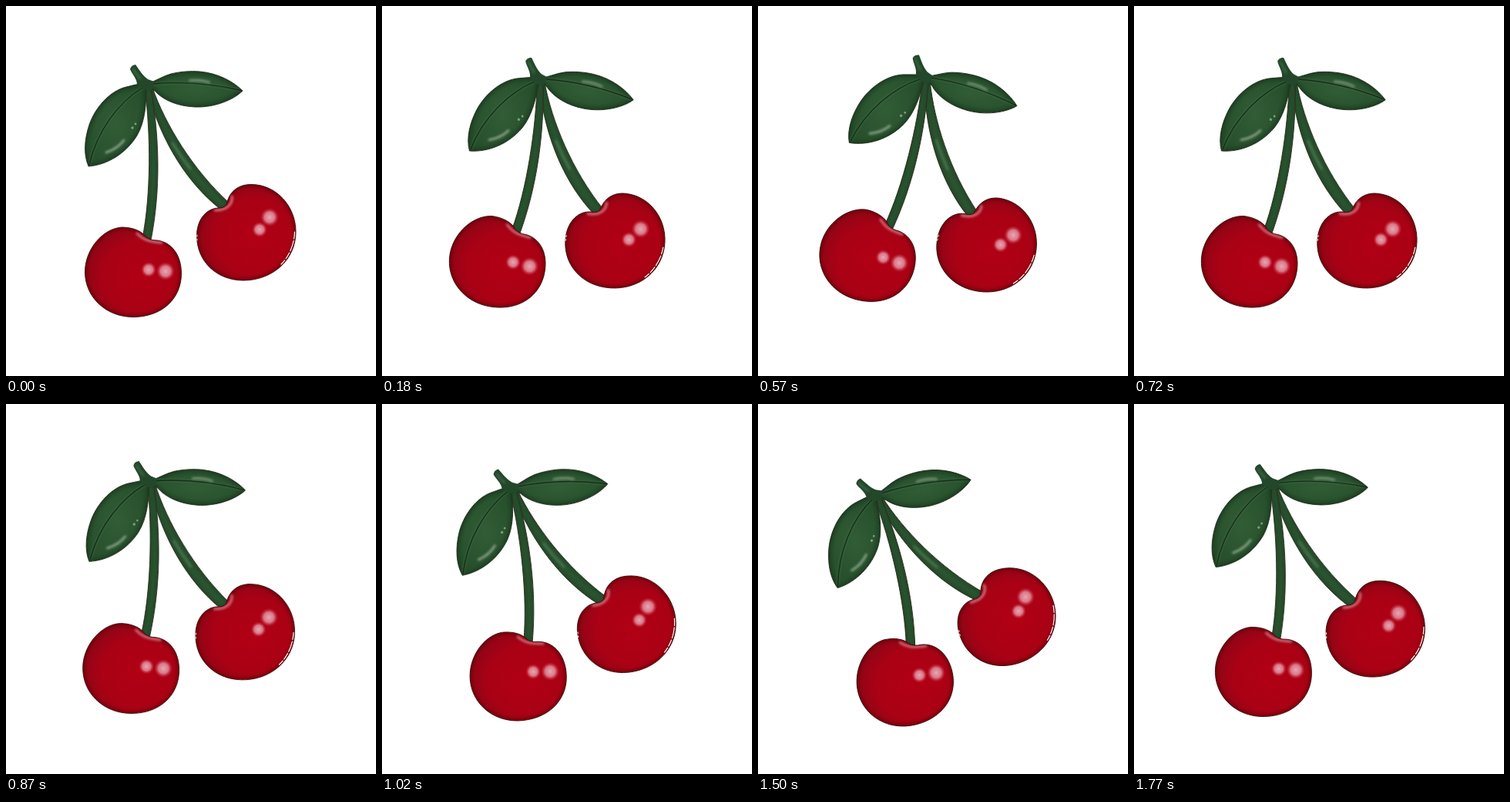
These frames come from a looping animation (480 by 480 pixels, 1.8 s). An HTML page:

```html
<!DOCTYPE html>
<html lang="en">
<head>
<meta charset="utf-8">
<title>Swinging cherries</title>
<style>
  html, body { margin: 0; width: 100%; height: 100%; overflow: hidden; background: #fff; }
  svg { display: block; width: 100%; height: 100%; }
</style>
</head>
<body>
<svg viewBox="0 0 480 480" fill="none" stroke-linecap="round" stroke-linejoin="round">
  <defs>
    <filter id="soft" x="-30%" y="-30%" width="160%" height="160%"><feGaussianBlur stdDeviation="2.6"/></filter>
    <filter id="glow" filterUnits="userSpaceOnUse" x="80" y="60" width="320" height="360"><feGaussianBlur stdDeviation="1.4"/></filter>
    <radialGradient id="red" cx=".58" cy=".55" r=".64">
      <stop offset="0" stop-color="#b10014"/>
      <stop offset=".6" stop-color="#aa0115"/>
      <stop offset="1" stop-color="#880616"/>
    </radialGradient>
    <radialGradient id="green" r=".6">
      <stop offset="0" stop-color="#315d35"/>
      <stop offset="1" stop-color="#264d2b"/>
    </radialGradient>
    <radialGradient id="shine">
      <stop offset="0" stop-color="#ecb0bb" stop-opacity=".95"/>
      <stop offset=".55" stop-color="#e08c9b" stop-opacity=".85"/>
      <stop offset="1" stop-color="#cc3048" stop-opacity="0"/>
    </radialGradient>
  </defs>
  <g id="swing"></g>
</svg>
<script>
const PERIOD = 1800, STEP = 30, SWING = 15;
const swing = document.getElementById('swing');
let clips = 0;

const line = (d, color, width, extra = '') =>
  `<path d="${d}" stroke="${color}" stroke-width="${width}" ${extra}/>`;
const glow = (d, color, width, opacity) =>
  line(d, color, width, `filter="url(#glow)" opacity="${opacity}"`);

// Filled outline with a soft dark rim inside it
function body(d, fill, rim, edge, rimWidth, details = '') {
  const id = 'clip' + clips++;
  return `<clipPath id="${id}"><path d="${d}"/></clipPath>
    <g clip-path="url(#${id})"><path d="${d}" fill="${fill}"/>
    ${line(d, rim, rimWidth, 'filter="url(#soft)"')}${details}</g>
    ${line(d, edge, .9)}`;
}

const leaf = (d, vein, details) =>
  body(d, 'url(#green)', '#17331c', '#24301b', 4,
    glow(vein, '#4a7650', 3, .5) + line(vein, '#152d19', 1.4) + details);

const cherry = (d, dip, shines) =>
  body(d, 'url(#red)', '#5c000d', '#3c0a0c', 3.5,
    glow(dip, '#e98a98', 3, .85) +
    shines.map(([x, y, r]) => `<circle cx="${x}" cy="${y}" r="${r}" fill="url(#shine)"/>`).join(''));

const stem = d => body(d, '#2b5431', '#17341d', '#2a2d18', 2.5);

swing.innerHTML =
  stem('M190 106C207 154 242 212 290 256L280 265C238 233 201 178 183 108Z') +
  glow('M216 178Q227 196 239 211', '#5f8a64', 3, .6) +
  stem('M188 106C199 170 201 238 188 304L177 301C188 246 188 166 180 106Z') +
  leaf('M183 101C193 98 203 91 214 88C226 85 240 84 251 85C275 87 295 98 307 110C295 122 270 132 245 131C222 130 206 122 197 114Q191 107 183 106Z',
    'M190 101Q246 96 305 109.5',
    glow('M238 96.5Q252 95 264 99', '#9fb69f', 2.2, .85)) +
  leaf('M180 101C174 100 165 103 156 105C135 110 116 131 108 154C102 172 100 192 107 208C132 206 156 191 170 168C181 149 182 125 182 105Z',
    'M177 106C146 125 118 162 108 206',
    glow('M130 190Q145 185 153 174', '#a9bda8', 2.6, .85) +
    '<g fill="#7f9c81"><circle cx="164" cy="158" r="1.7"/><circle cx="168" cy="153" r="1.4"/></g>') +
  '<path d="M161 82Q162 77 168 76C173 83 177 90 184 95L192 98L189 109L179 109L170 102C170 94 163 88 161 82Z" fill="#23472a"/>' +
  glow('M165 82Q169 89 174 94', '#55805b', 2.5, .6) +
  cherry('M182 300C176 291 163 287 150 287C125 289 102.5 316 102.5 345C102.5 378 130 403.5 165 403.5C202 403.5 227.5 380 227.5 347C227.5 322 214 306 196 304C190 304 186 303 182 300Z',
    'M170 295Q177 302 184 304T202 307', [[185, 342, 10], [207, 344, 12]]) +
  cherry('M286 258C289 241 301 231.5 318 231.5C351 231.5 376 260 376 293C376 330 345 356 308 356C274 356 247.5 332 247.5 298C247.5 278 259 263 275 262C280 262 284 261 286 258Z',
    'M271 265Q282 265 288 260T293 247', [[329, 290, 10], [342, 274, 12]]) +
  line('M374.5 293C374 310 367 325 357 335', '#fff', 1.2, 'stroke-dasharray="9 2.5 14 2.5"') +
  line('M248 297V304', '#fff', .9, 'stroke-dasharray="2 3"');

const start = performance.now();

function draw() {
  const time = Math.floor((performance.now() - start) / STEP) * STEP;
  const angle = SWING * Math.sin(2 * Math.PI * time / PERIOD);
  swing.setAttribute('transform', `rotate(${angle.toFixed(3)} 240 240)`);
  requestAnimationFrame(draw);
}
draw();
</script>
</body>
</html>
```
